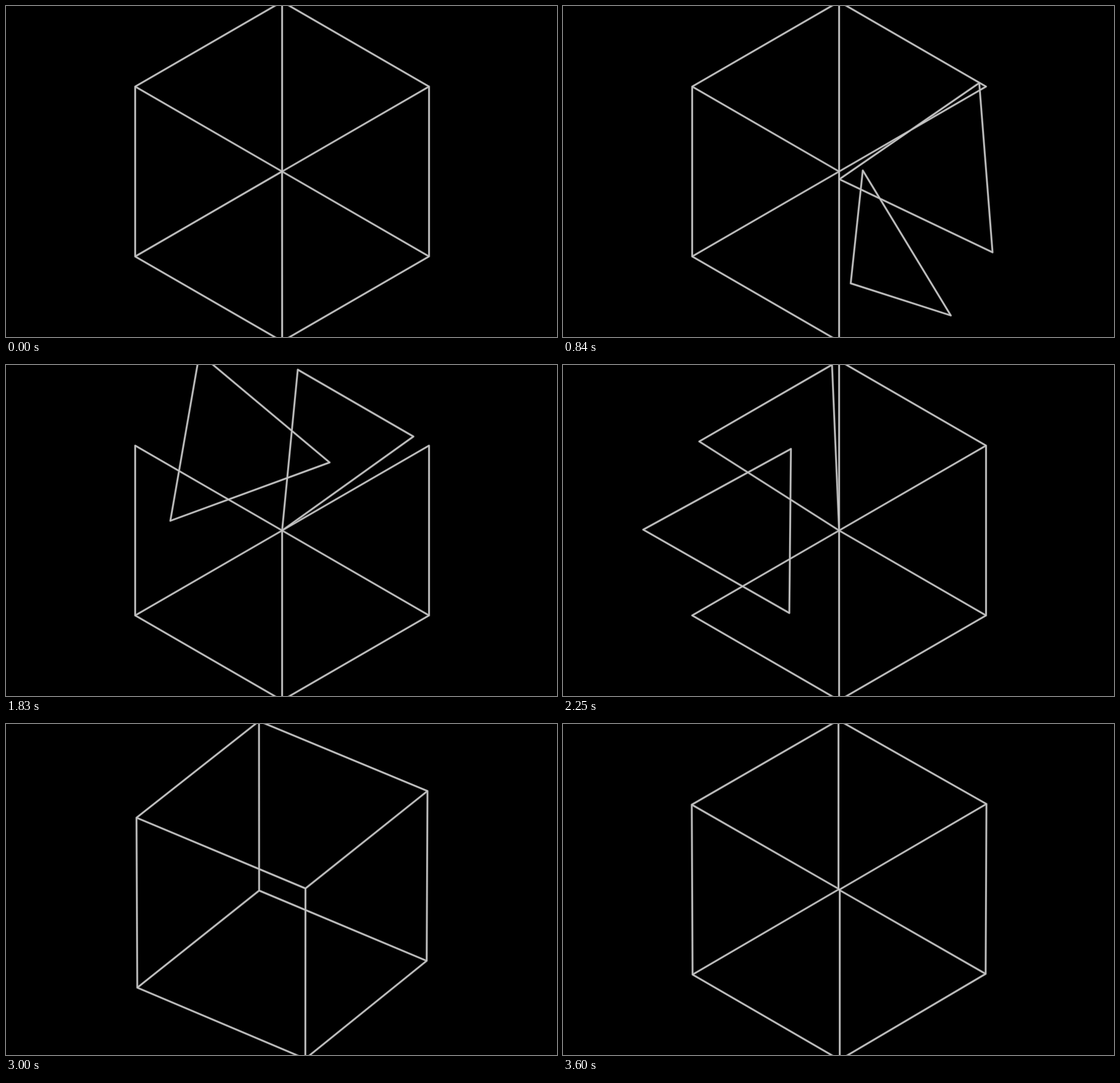
Animation of 900 by 540 pixels, one loop 3.63 s. Source, as an HTML page with a canvas:

```html
<!DOCTYPE html>
<html lang="en">
<head>
<meta charset="utf-8">
<title>Hexagon and cube</title>
<style>
  html, body { margin: 0; width: 100%; height: 100%; overflow: hidden; background: #000; }
  canvas { display: block; }
</style>
</head>
<body>
<canvas id="stage" width="900" height="540"></canvas>
<script>
const ctx = document.getElementById('stage').getContext('2d');
const LOOP = 3630, STEP = 30;
const CX = 451, CY = 270;
const HALF_WIDTH = 240;
const HEX = HALF_WIDTH / Math.cos(Math.PI / 6);
const TRI = HEX / Math.sqrt(3);
const STAGGER = 385;
const CUBE_START = 2734;
const CAMERA = 36000;

// A dim wide stroke under a bright thin one gives the soft line edge.
const STROKES = [
  { width: 3.6, color: '#707070' },
  { width: 2, color: '#c6c6c6' },
];

const rad = deg => deg * Math.PI / 180;
const progress = (t, start, length) => Math.min(1, Math.max(0, (t - start) / length));
const smooth = p => p * p * (3 - 2 * p);

function addLoop(path, points) {
  points.forEach(([x, y], i) => i ? path.lineTo(x, y) : path.moveTo(x, y));
  path.closePath();
}

// Each triangle turns about its centroid, then flips over its radial axis.
function addTriangle(path, index, t) {
  const local = t - index * STAGGER;
  const turn = rad(-120) * smooth(progress(local, -8, 670));
  const flip = Math.cos(Math.PI * progress(local, 284, 496));
  const axis = rad(-60 - 60 * index);
  const ux = Math.cos(axis), uy = Math.sin(axis);
  addLoop(path, [0, 1, 2].map(k => {
    const a = turn + rad(120 * k);
    const u = TRI * (Math.cos(a) - 1);
    const v = TRI * Math.sin(a) * flip;
    return [CX + u * ux - v * uy, CY + u * uy + v * ux];
  }));
}

// Isometric cube spinning about its vertical axis.
function addCube(path, t) {
  const p = progress(t, CUBE_START, LOOP - CUBE_START);
  const spin = Math.PI * (1 - Math.sin(p * Math.PI / 2));
  const sinTilt = Math.sqrt(1 / 3), cosTilt = Math.sqrt(2 / 3);
  const half = HALF_WIDTH / Math.SQRT2;

  const corner = (k, level) => {
    const a = spin + k * Math.PI / 2;
    const x = HALF_WIDTH * Math.sin(a), z = HALF_WIDTH * Math.cos(a), y = level * half;
    const depth = z * cosTilt - y * sinTilt;
    const scale = CAMERA / (CAMERA - depth);
    return [CX + x * scale, CY + (z * sinTilt + y * cosTilt) * scale];
  };

  const top = [0, 1, 2, 3].map(k => corner(k, -1));
  const bottom = [0, 1, 2, 3].map(k => corner(k, 1));
  addLoop(path, top);
  addLoop(path, bottom);
  top.forEach((point, k) => {
    path.moveTo(...point);
    path.lineTo(...bottom[k]);
  });
}

function draw(now) {
  const t = Math.floor((now % LOOP) / STEP) * STEP;
  const path = new Path2D();
  if (t < CUBE_START) {
    for (let i = 0; i < 6; i++) addTriangle(path, i, t);
  } else {
    addCube(path, t);
  }

  ctx.fillStyle = '#000';
  ctx.fillRect(0, 0, 900, 540);
  ctx.lineJoin = 'round';
  for (const { width, color } of STROKES) {
    ctx.lineWidth = width;
    ctx.strokeStyle = color;
    ctx.stroke(path);
  }
}

const begin = performance.now();
function tick() {
  draw(performance.now() - begin);
  requestAnimationFrame(tick);
}
tick();
</script>
</body>
</html>
```
